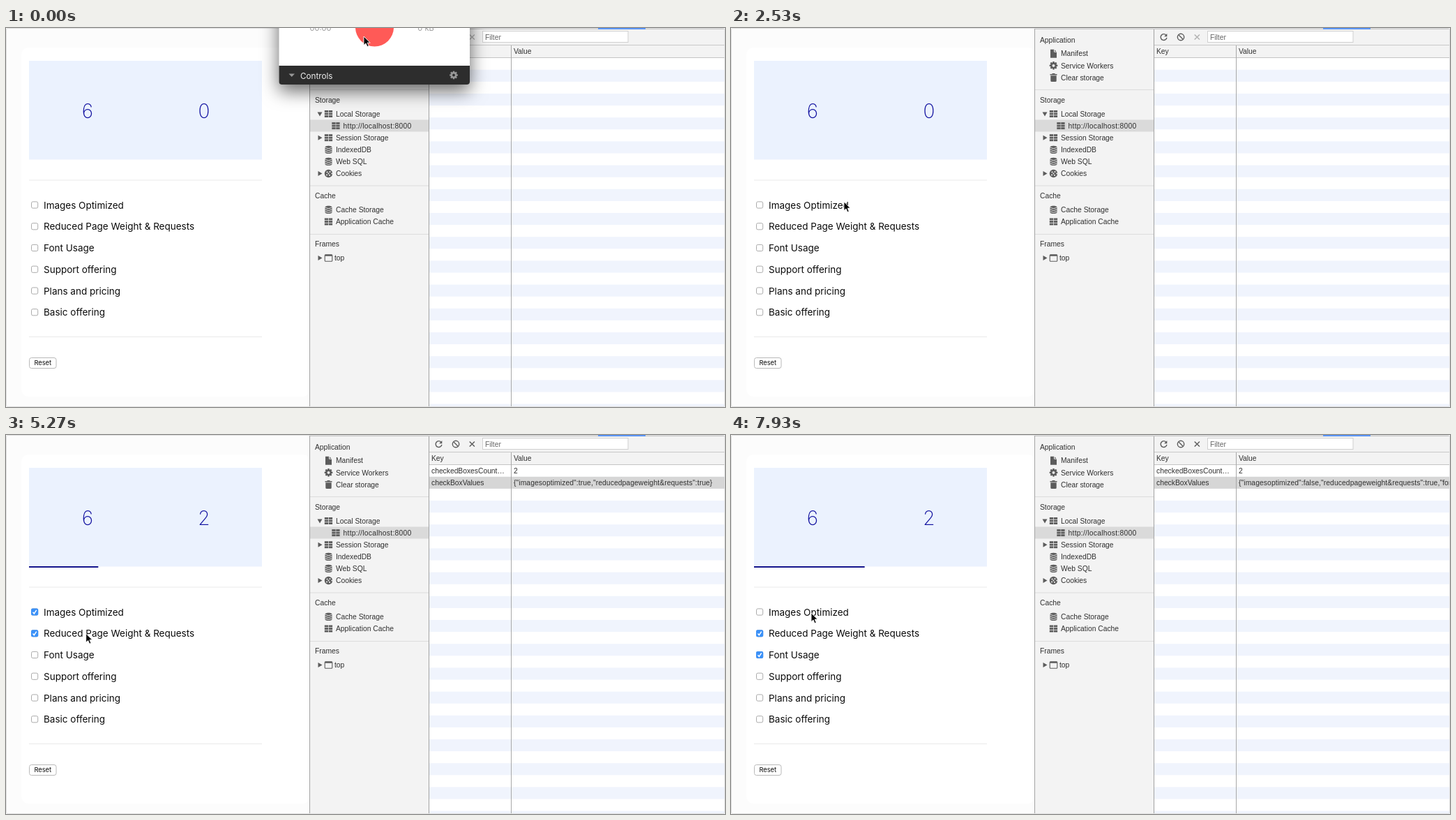
Write an HTML page that moves like this. It is 1031 by 543 pixels and loops after 8 s.

```html
<!DOCTYPE html>
<html lang="en">
<head>
<meta charset="utf-8">
<title>Checklist with local storage</title>
<style>
html, body { margin: 0; width: 100%; height: 100%; overflow: hidden; background: #fff; }
svg { display: block; width: 100%; height: 100%; }
text { white-space: pre; }
.page { font: 400 13.5px Inter, "Open Sans", sans-serif; fill: #0b0b0b; }
.digit { font: 200 28px Inter, sans-serif; fill: #1111a0; text-anchor: middle; }
.tools { font: 10.3px "Liberation Sans", Arial, sans-serif; fill: #303030; }
.dark { fill: #5c5c5c; }
.line { fill: none; stroke: #5c5c5c; stroke-width: 1.4; }
</style>
</head>
<body>
<svg id="stage" viewBox="0 0 1031 543" preserveAspectRatio="none"></svg>
<script>
const LOOP = 8000, ROW = 17.1, BAR_STEP = 334 / 6;
const stage = document.getElementById('stage');

const rect = (x, y, w, h, fill, extra = '') =>
  `<rect x="${x}" y="${y}" width="${w}" height="${h}" fill="${fill}" ${extra}/>`;
const text = (x, y, value, cls = 'tools', extra = '') =>
  `<text x="${x}" y="${y}" class="${cls}" ${extra}>${value.replace(/&/g, '&amp;')}</text>`;
const path = (d, cls = 'dark', extra = '') => `<path d="${d}" class="${cls}" ${extra}/>`;
const at = (x, y, content, extra = '') => `<g transform="translate(${x} ${y})" ${extra}>${content}</g>`;
const many = (n, make) => Array.from({ length: n }, (_, i) => make(i)).join('');

const gear = many(8, i => rect(-1.2, -5.8, 2.4, 3, 'inherit', `transform="rotate(${i * 45})"`)
  .replace('fill="inherit"', '')) + '<circle r="3.2" fill="none" stroke="currentColor" stroke-width="2.6"/>';

// Sidebar icons, each drawn around its own centre
const icons = {
  file: path('M-4.5-6H1L4.5-2.5V6H-4.5Z') + path('M1-6V-2.5H4.5', 'line', 'style="stroke:#f3f3f3;stroke-width:1"'),
  gear: `<g fill="#5c5c5c" color="#5c5c5c">${gear}</g>`,
  trash: path('M-5-5H-2V-6H2V-5H5V-3.5H-5ZM-4.2-2.6H4.2V4.5Q4.2 6 2.7 6H-2.7Q-4.2 6-4.2 4.5Z'),
  grid: many(6, i => rect(-5.7 + i % 2 * 6, -5 + (i >> 1) * 3.6, 5.3, 2.8, '#5c5c5c')),
  database: path('M-5-3.2V3.6C-5 6.4 5 6.4 5 3.6V-3.2C5-6.4-5-6.4-5-3.2Z') +
    many(3, i => path(`M-5 ${i * 2.8 - 2.9}Q0 ${i * 2.8 - .3} 5 ${i * 2.8 - 2.9}`, 'line', 'style="stroke:#f3f3f3;stroke-width:.9"')),
  cookie: '<circle r="5.7" class="dark"/>' +
    [[-2, -2], [2, -2.5], [-2.5, 2], [1.5, 2.5], [4.8, 0], [0, 0]].map(([x, y]) => `<circle cx="${x}" cy="${y}" r="1" fill="#f3f3f3"/>`).join(''),
  frame: '<rect x="-5.3" y="-4.6" width="10.6" height="9.4" rx="1" class="line" style="stroke-width:1.1"/>' + rect(-5, -4.6, 10, 2, '#5c5c5c')
};

const sidebarItem = (y, icon, label, arrow, indent = 0) =>
  at(462.5 + indent, y, icons[icon]) +
  (arrow ? at(450, y, path(arrow === 'open' ? 'M-3.5-2.5H3.5L0 3.5Z' : 'M-2.5-3.5V3.5L3.5 0Z')) : '') +
  text(473 + indent, y + 3.7, label, 'tools', indent ? 'letter-spacing=".28"' : '');

function sidebar() {
  return rect(436, 1, 170, 542, '#f3f3f3') +
    rect(436, 131.5, 170, 17, '#dadada') +
    [88, 225.5, 295].map(y => rect(436, y, 170, 1, '#dcdcdc')).join('') +
    [[20.6, 'Application'], [106.8, 'Storage'], [244.3, 'Cache'], [313.3, 'Frames']]
      .map(([y, label]) => text(443, y, label)).join('') +
    sidebarItem(36.7, 'file', 'Manifest') +
    sidebarItem(53.8, 'gear', 'Service Workers') +
    sidebarItem(70.9, 'trash', 'Clear storage') +
    sidebarItem(123, 'grid', 'Local Storage', 'open') +
    sidebarItem(140.1, 'grid', 'http://localhost:8000', '', 10.5) +
    sidebarItem(157.2, 'grid', 'Session Storage', 'closed') +
    sidebarItem(174.3, 'database', 'IndexedDB') +
    sidebarItem(191.4, 'database', 'Web SQL') +
    sidebarItem(208.5, 'cookie', 'Cookies', 'closed') +
    sidebarItem(260.3, 'database', 'Cache Storage') +
    sidebarItem(277.5, 'grid', 'Application Cache') +
    at(-2, 0, '') + sidebarItem(329.4, 'frame', '', 'closed') + text(471, 333.1, 'top');
}

function table() {
  return many(15, i => rect(607, 59.8 + i * 2 * ROW, 424, ROW, '#f0f4fd')) +
    rect(607, 59.8, 424, ROW, '#d6d6d6', 'id="selected"') +
    rect(607, 1, 424, 42, '#f3f3f3') +
    rect(607, 24, 424, 1, '#c9c9c9') + rect(607, 42, 424, 1, '#c4c4c4') +
    rect(724, 25, 1, 518, '#a8a8a8') +
    at(620.5, 13, path('M3.4-2.8A4.4 4.4 0 1 0 4.4 .8', 'line') + path('M4.8-5V-.8H.6Z')) +
    at(645, 13, '<circle r="4.7" class="line"/>' + path('M-3.2-3.2L3.2 3.2', 'line')) +
    at(668.3, 13, path('M-3.6-3.6L3.6 3.6M3.6-3.6L-3.6 3.6', 'line', 'id="remove"')) +
    rect(683.5, 4.5, 208.5, 16, '#fff', 'stroke="#d0d0d0"') +
    text(687, 16.5, 'Filter', 'tools', 'style="fill:#666"') +
    text(610, 36.9, 'Key') + text(728, 36.9, 'Value') +
    '<g id="entries">' +
    text(610, 54.8, 'checkedBoxesCount…') + text(610, 72, 'checkBoxValues') +
    text(728, 54.8, '', 'tools', 'id="storedCount"') +
    text(728, 72, '', 'tools', 'id="storedBoxes" letter-spacing=".1"') + '</g>';
}

const labels = ['Images Optimized', 'Reduced Page Weight & Requests', 'Font Usage',
  'Support offering', 'Plans and pricing', 'Basic offering'];

function page() {
  return rect(0, 0, 436, 543, '#fcfcfc') + rect(22, 28, 414, 500, '#fff', 'rx="10"') +
    rect(33, 47, 334, 141.5, '#ebf2fe') +
    rect(33, 188, 0, 2, '#14148c', 'id="bar"') +
    text(117, 128.5, '6', 'digit') + text(284, 128.5, '0', 'digit', 'id="count"') +
    rect(33, 217.5, 334, 1, '#e9e9e9') + rect(33, 442, 334, 1, '#e9e9e9') +
    labels.map((label, i) => {
      const y = 253.7 + i * 30.75;
      return rect(36.5, y - 4.8, 9.2, 9.2, '#fff', 'rx="2" stroke="#ababab"') +
        at(41.1, y - .2, rect(-5.1, -5.1, 10.2, 10.2, '#3b91f8', 'rx="2"') +
          path('M-2.6 .2L-.8 2.4L2.6-2.6', 'line', 'style="stroke:#fff;stroke-width:1.5"'), 'class="check"') +
        text(54, y + 5, label, 'page');
    }).join('') +
    rect(33.5, 472.5, 38.5, 15, '#fff', 'rx="3" stroke="#b9b9b9"') +
    text(52.7, 483.3, 'Reset', 'page', 'style="font-size:9.3px;text-anchor:middle"');
}

function recorder() {
  const grey = 'style="fill:#9b9b9b;font-size:11px;text-anchor:middle"';
  return '<g id="recorder">' +
    rect(391.5, -120, 273.5, 201, '#fff', 'rx="4" style="filter:drop-shadow(0 9px 13px rgba(0,0,0,.6))"') +
    path('M391.5 54H665V77Q665 81 661 81H395.5Q391.5 81 391.5 77Z', '', 'fill="#2d2d2d"') +
    '<circle cx="528.5" cy="-1" r="27.5" fill="#ff5a57"/>' +
    text(451, 4, '00:00', 'page', grey) + text(602, 4, '0 kB', 'page', grey) +
    path('M405.5 65.5H414L409.7 70Z', '', 'fill="#989898"') +
    text(422, 72.7, 'Controls', 'page', 'style="fill:#eee;font-size:11.7px"') +
    at(642, 67.5, gear, 'fill="#989898" color="#989898"') + '</g>';
}

const cursors = '<g id="cursor">' +
  path('M0 0V12.6L3 9.9L5 14.7L7.2 13.7L5.2 9.1H9.2Z', '', 'id="arrow" fill="#000" stroke="#fff" stroke-width=".9"') +
  path('M-3.5 7L-6.5 1.5Q-7 -.8-4.6 .3L-3.6 1.3L-5-3.6Q-4.6-5.6-3-4.4L-2-1.2L-2.2-5.8Q-.8-7.6 .2-5.8L.5-1.4L1.8-5.5Q3.4-6.8 3.9-4.8L3.2-.9L4.8-3.3Q6.7-3.8 6.4-1.6L4.5 4.2V7Z',
    '', 'id="hand" fill="#fff" stroke="#000" stroke-width="1.1"') + '</g>';

stage.innerHTML = rect(0, 0, 1031, 543, '#fff') + page() + sidebar() + table() +
  rect(435, 1, 1, 542, '#a3a3a3') + rect(606, 1, 1, 542, '#a3a3a3') +
  rect(436, 1, 595, 1, '#c8c8c8') +
  rect(.5, .5, 1030, 542, 'none', 'rx="2" stroke="#e0e0e0"') +
  rect(849, 0, 68, 2, '#5b95f5') + recorder() + cursors;

const el = id => document.getElementById(id);
const checks = document.querySelectorAll('.check');
const show = (node, on) => node.setAttribute('visibility', on ? 'visible' : 'hidden');

// time, x, y
const cursorPath = [
  [0, 513, 12], [250, 513, 12], [900, 414, 35], [1950, 414, 35], [2530, 162, 249],
  [2700, 146, 254], [3000, 146, 254], [3330, 117, 259], [3600, 117, 259], [3670, 115, 255],
  [4500, 115, 255], [4800, 119, 280], [5050, 117, 284], [5250, 115, 284], [5500, 101, 309],
  [6130, 101, 307], [6870, 101, 307], [7600, 115, 255], [LOOP, 115, 255]
];

// time, number of checked boxes
const clicks = [[4030, 1], [5030, 2], [5570, 3], [7865, 2]];

function cursorAt(t) {
  const i = cursorPath.findIndex(point => point[0] > t);
  const [t0, x0, y0] = cursorPath[i - 1], [t1, x1, y1] = cursorPath[i];
  const p = (t - t0) / (t1 - t0), k = p * p * (3 - 2 * p);
  return [x0 + (x1 - x0) * k, y0 + (y1 - y0) * k];
}

// The CSS "ease" curve, solved by bisection
function ease(x) {
  if (x >= 1) return 1;
  const bezier = (s, a, b) => 3 * a * s * (1 - s) ** 2 + 3 * b * s * s * (1 - s) + s ** 3;
  let low = 0, high = 1;
  for (let i = 0; i < 20; i++) {
    const mid = (low + high) / 2;
    if (bezier(mid, .25, .25) < x) low = mid; else high = mid;
  }
  return bezier(low, .1, 1);
}

function draw() {
  const t = performance.now() % LOOP;
  let count = 0, bar = 0;
  for (const [time, next] of clicks) {
    if (t < time) break;
    bar += (next * BAR_STEP - bar) * ease((t - time) / 500);
    count = next;
  }
  const touched = clicks.slice(0, 3).filter(([time]) => t >= time).length;
  const boxes = [count > 0 && t < clicks[3][0], touched > 1, touched > 2];
  const keys = ['imagesoptimized', 'reducedpageweight&requests', 'fontusage'];

  checks.forEach((node, i) => show(node, boxes[i]));
  el('count').textContent = el('storedCount').textContent = count;
  el('storedBoxes').textContent =
    '{' + keys.slice(0, touched).map((key, i) => `"${key}":${boxes[i]}`).join() + '}';
  el('bar').setAttribute('width', bar);
  show(el('entries'), touched > 0);
  show(el('selected'), touched > 1);
  el('remove').style.stroke = touched ? '#5c5c5c' : '#b0b0b0';
  el('recorder').style.opacity = Math.max(0, Math.min(1, (320 - t) / 220));

  const [x, y] = cursorAt(t), grabbing = t > 750 && t < 2050;
  el('cursor').setAttribute('transform', `translate(${x} ${y})`);
  show(el('arrow'), !grabbing);
  show(el('hand'), grabbing);
  requestAnimationFrame(draw);
}
draw();
</script>
</body>
</html>
```
